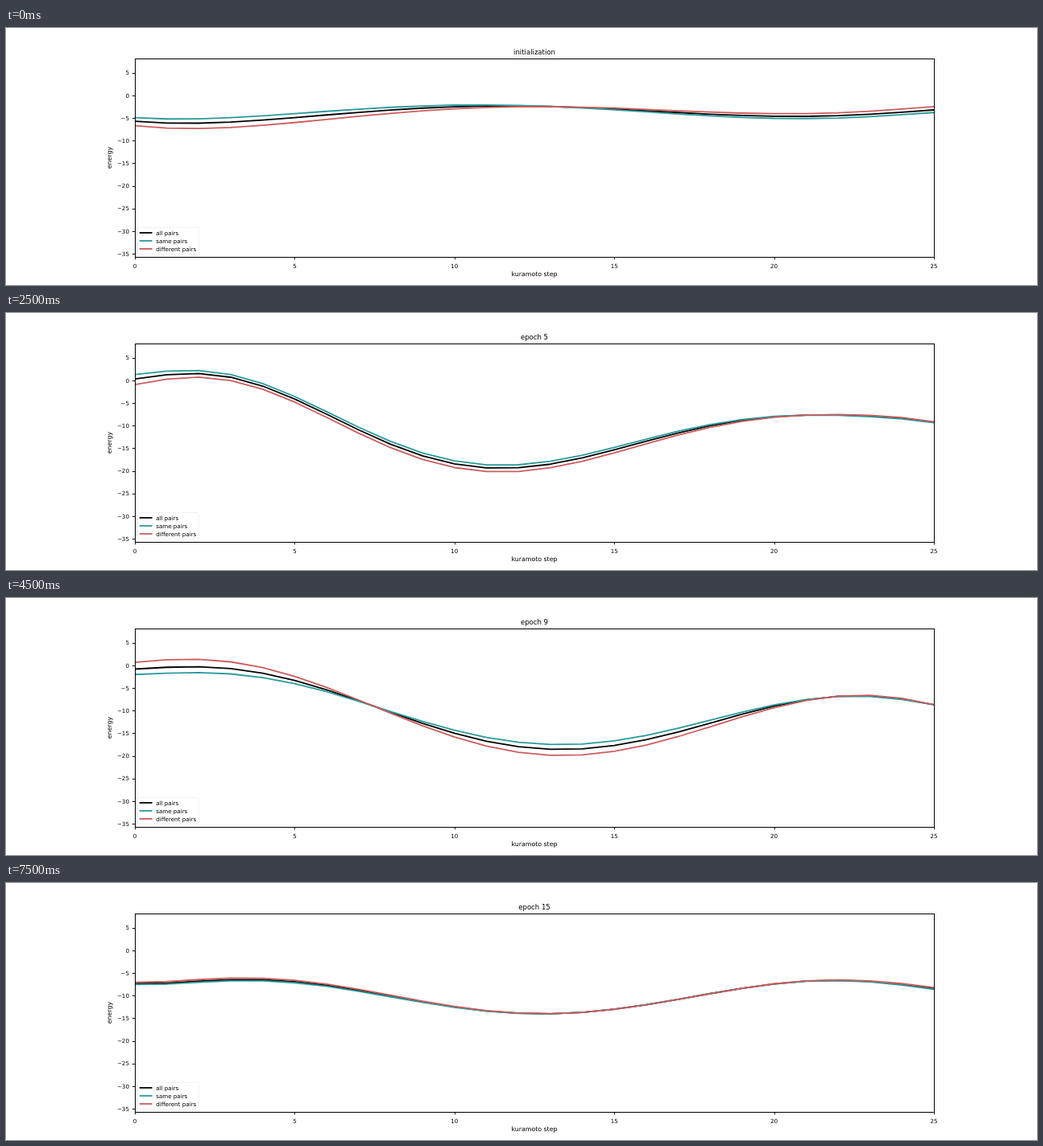
Animation of 1280 by 320 pixels, one loop 8000 ms. Source, as an HTML page with a canvas:

```html
<!DOCTYPE html>
<html lang="en">
<head>
<meta charset="utf-8">
<title>Energy per step</title>
<style>
html, body { margin: 0; width: 100%; height: 100%; overflow: hidden; background: #fff; }
canvas { display: block; width: 1280px; height: 320px; }
</style>
</head>
<body>
<canvas id="stage" width="1280" height="320"></canvas>
<script>
const ctx = document.getElementById('stage').getContext('2d');
const FONT = '"DejaVu Sans", Verdana, sans-serif';
const BLACK = '#000', TEAL = '#2a9a9c', RED = '#cd5c5c';
const SMALL = 7.11, MEDIUM = 7.82, LARGE = 8.53;
const LEFT = 160, RIGHT = 1152, TOP = 38.4, BOTTOM = 284.8;
const HOLD = 500, EPOCHS = 16, STEPS = 25;
const xAt = step => LEFT + step * (RIGHT - LEFT) / STEPS;
const yAt = energy => 84 - energy * 5.63;
const snap = v => Math.round(v) + 0.5;

// Key points, dense at the ends so that one polynomial fits the whole curve
const MEAN_AT = [0, 1, 5, 10, 15, 20, 24, 25];
const GAP_AT = [0, 4, 12, 21, 25];

// Energy of all pairs, and how far same pairs lie above different pairs
const KEYS = [
  { epoch: 0, mean: [-5.7, -6.1, -4.9, -2.5, -3, -4.6, -3.7, -3.2], gap: [1.8, 2.1, 0.3, -1.1, -1.3] },
  { epoch: 2, mean: [0.4, 0.9, -4.1, -11.1, -8.2, -3.8, -2.6, -2.5], gap: [1.1, 1.5, 3.2, 1.8, 0.3] },
  { epoch: 4, mean: [-1.1, 0, -4.4, -16.2, -15.2, -12, -11.9, -11.8], gap: [1, 1.7, 2, 0.6, 0.8] },
  { epoch: 6, mean: [0.8, 1.7, -4, -19.2, -15.4, -6.7, -7.2, -8.4], gap: [2.6, 1.1, 1.3, -0.2, -0.6] },
  { epoch: 9, mean: [-0.8, -0.4, -3.3, -15, -17.7, -9, -7.4, -8.7], gap: [-2.7, -2.2, 2.2, 0.2, 0] },
  { epoch: 11, mean: [-6.7, -6.7, -7.5, -17.1, -19, -9.1, -5.8, -6.2], gap: [-2.2, -2.4, 0.6, -0.3, 0] },
  { epoch: 15, mean: [-7.3, -7.2, -6.9, -12.5, -13, -7.4, -7.5, -8.4], gap: [-0.5, -0.6, -0.1, -0.1, -0.4] }
];
const easeOut = u => 1 - (1 - u) ** 2;

// Lagrange polynomial through all points
const poly = (xs, ys, x) => ys.reduce((sum, y, i) =>
  sum + xs.reduce((p, xj, j) => j === i ? p : p * (x - xj) / (xs[i] - xj), y), 0);

function curvesFor(epoch) {
  const next = Math.max(1, KEYS.findIndex(k => k.epoch >= epoch));
  const a = KEYS[next - 1], b = KEYS[next];
  const w = easeOut((epoch - a.epoch) / (b.epoch - a.epoch));
  const mix = name => a[name].map((v, i) => v + (b[name][i] - v) * w);
  const mean = mix('mean'), gap = mix('gap');
  const curve = share => Array.from({ length: STEPS + 1 }, (_, s) =>
    yAt(poly(MEAN_AT, mean, s) + share * poly(GAP_AT, gap, s)));
  return [[curve(0), BLACK], [curve(4 / 9), TEAL], [curve(-5 / 9), RED]];
}
const CURVES = Array.from({ length: EPOCHS }, (_, epoch) => curvesFor(epoch));

function text(str, x, y, size, align = 'center') {
  ctx.font = size + 'px ' + FONT;
  ctx.textAlign = align;
  ctx.fillStyle = BLACK;
  ctx.fillText(str, x, y);
}

function stroke(points, color, width) {
  ctx.strokeStyle = color;
  ctx.lineWidth = width;
  ctx.lineJoin = 'round';
  ctx.beginPath();
  points.forEach(([x, y]) => ctx.lineTo(x, y));
  ctx.stroke();
}

function drawCurves(epoch) {
  ctx.save();
  ctx.beginPath();
  ctx.rect(LEFT, TOP, RIGHT - LEFT, BOTTOM - TOP);
  ctx.clip();
  for (const [ys, color] of CURVES[epoch]) {
    stroke(ys.map((y, s) => [xAt(s), y]), color, 1.8);
  }
  ctx.restore();
}

function drawAxes() {
  ctx.strokeStyle = BLACK;
  ctx.lineWidth = 1;
  ctx.lineJoin = 'miter';
  ctx.strokeRect(snap(LEFT), snap(TOP), RIGHT - LEFT, snap(BOTTOM) - snap(TOP));
  for (let s = 0; s <= STEPS; s += 5) {
    const x = snap(xAt(s));
    stroke([[x, 285], [x, 288.3]], BLACK, 0.9);
    text(String(s), xAt(s), 298.6, SMALL);
  }
  for (let e = 5; e >= -35; e -= 5) {
    const y = snap(yAt(e));
    stroke([[156.7, y], [160, y]], BLACK, 0.9);
    text(String(e).replace('-', '\u2212'), 152.9, yAt(e) + 2.6, SMALL, 'right');
  }
  text('kuramoto step', 656, 309.2, MEDIUM);
  ctx.save();
  ctx.translate(130.6, 161.6);
  ctx.rotate(-Math.PI / 2);
  text('energy', 0, 0, MEDIUM);
  ctx.restore();
}

function drawLegend() {
  ctx.beginPath();
  ctx.roundRect(163.5, 248.5, 75.7, 32.7, 1.4);
  ctx.fillStyle = 'rgba(255,255,255,0.8)';
  ctx.fill();
  ctx.strokeStyle = 'rgba(204,204,204,0.5)';
  ctx.lineWidth = 0.5;
  ctx.stroke();
  [['all pairs', BLACK], ['same pairs', TEAL], ['different pairs', RED]].forEach(([name, color], i) => {
    const y = 255 + i * 10;
    stroke([[165.7, y], [181.5, y]], color, 1.8);
    text(name, 186.2, y + 2.5, SMALL, 'left');
  });
}

function draw(now) {
  const epoch = Math.floor(now / HOLD) % EPOCHS;
  ctx.fillStyle = '#fff';
  ctx.fillRect(0, 0, 1280, 320);
  drawCurves(epoch);
  drawAxes();
  drawLegend();
  text(epoch ? 'epoch ' + epoch : 'initialization', 656, 33.4, LARGE);
}

let start;
function tick(now) {
  if (start === undefined) start = now;
  draw(Math.max(0, now - start));
  requestAnimationFrame(tick);
}
draw(0);
requestAnimationFrame(tick);
</script>
</body>
</html>
```
